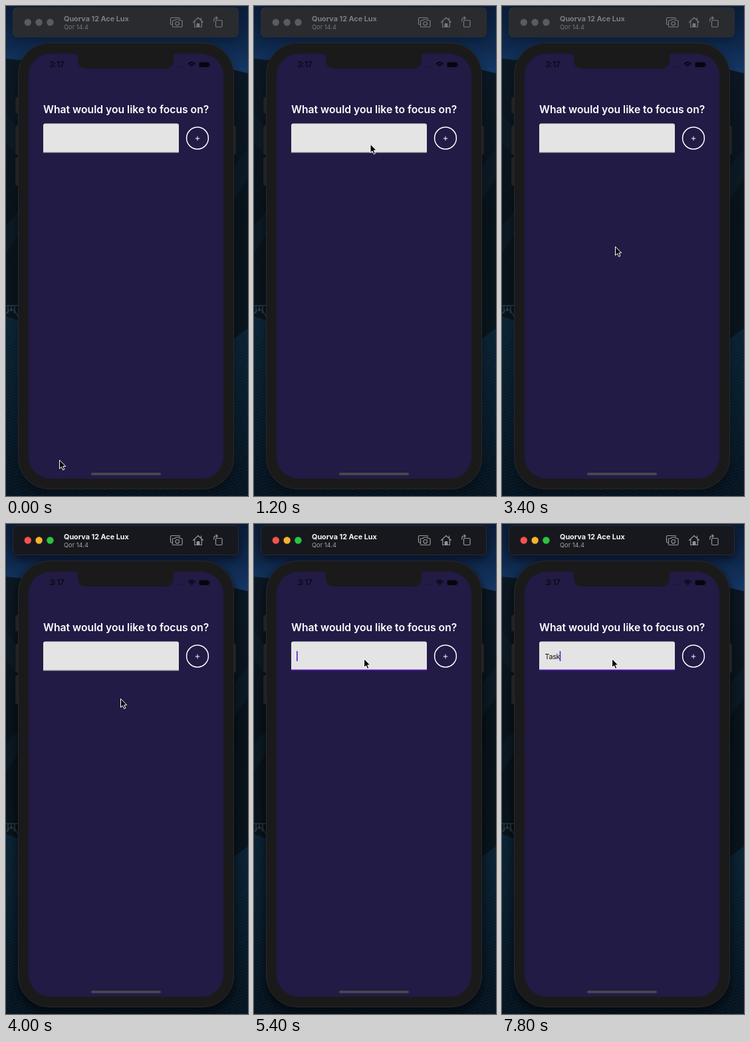
Recreate the animation shown at these times as an HTML page. Size 364 by 736 pixels, loop 8000 ms.

```html
<!DOCTYPE html>
<html lang="en">
<head>
<meta charset="utf-8">
<title>Focus app in a simulator</title>
<style>
  html, body { margin: 0; width: 100%; height: 100%; overflow: hidden; background: #081320; }
  svg { display: block; width: 100%; height: 100%; }
  text { font-family: Inter, "Noto Sans", sans-serif; white-space: pre; }
  .icon { fill: none; stroke-width: 1.2; stroke-linejoin: round; stroke-linecap: round; }

  #window { --bar: #2a2b2e; --title: #7c7d80; --sub: #747578; --icon: #77797c; --red: #5a5b5e; --yellow: #5a5b5e; --green: #5a5b5e; }
  #window.active { --bar: #17181d; --title: #f6f6f7; --sub: #a2a3a6; --icon: #96989b; --red: #f4544c; --yellow: #f6b42c; --green: #2bc443; }
  #shadow { opacity: .25; }
  .active #shadow { opacity: .55; }
</style>
</head>
<body>
<svg viewBox="0 0 364 736" preserveAspectRatio="none">
  <defs>
    <linearGradient id="sky" x2="0" y2="1">
      <stop stop-color="#0c1d38"/><stop offset=".55" stop-color="#0f2a50"/><stop offset="1" stop-color="#163c6b"/>
    </linearGradient>
    <linearGradient id="land" x2="0" y2="1">
      <stop stop-color="#0c1824"/><stop offset=".35" stop-color="#09131b"/><stop offset="1" stop-color="#0a161f"/>
    </linearGradient>
    <linearGradient id="sea" x2="0" y2="1">
      <stop stop-color="#0b2233"/><stop offset=".5" stop-color="#081b2a"/><stop offset="1" stop-color="#06121e"/>
    </linearGradient>
    <pattern id="waves" width="9" height="5" patternUnits="userSpaceOnUse" patternTransform="rotate(14)">
      <path d="M0 1.500Q2.500 .5 5 1.500M4 4Q6.500 3 9 4" fill="none" stroke="#1d4258" stroke-width=".8"/>
    </pattern>
    <filter id="blur" x="-20%" y="-20%" width="140%" height="140%"><feGaussianBlur stdDeviation="7"/></filter>
  </defs>

  <!-- Wallpaper -->
  <rect width="364" height="110" fill="url(#sky)"/>
  <path d="M0 79 18 81 180 76 343 96 364 101V736H0Z" fill="url(#land)"/>
  <path d="M0 160 18 186V225L0 205ZM343 240 364 215V260L343 290ZM0 330 18 310V345L0 372Z" fill="#10202d" opacity=".5"/>
  <path id="water" d="M0 466 18 472 343 500 364 484V736H0Z" fill="url(#sea)"/>
  <use href="#water" style="fill: url(#waves)"/>
  <path d="M0 466 18 472 343 500 364 484V736H0Z" fill="url(#waves)" opacity=".45"/>
  <path d="M0 450H18M3 451V462M8 451V459M13 451V462M0 463Q9 447 18 466" fill="none" stroke="#50687a" opacity=".7"/>

  <g id="window">
    <g id="shadow" filter="url(#blur)">
      <rect x="10" y="8" width="340" height="45" rx="9"/>
      <rect x="16" y="60" width="329" height="674" rx="47"/>
    </g>
    <rect x="10.500" y="2.500" width="339" height="44" rx="6" fill="var(--bar)" stroke="#34363a" stroke-width=".7"/>
    <circle cx="32.800" cy="24.500" r="5.200" fill="var(--red)"/>
    <circle cx="49.600" cy="24.500" r="5.200" fill="var(--yellow)"/>
    <circle cx="66.400" cy="24.500" r="5.200" fill="var(--green)"/>
    <text x="87" y="23" font-size="10.800" font-weight="700" fill="var(--title)">Quorva 12 Ace Lux</text>
    <text x="87" y="34.500" font-size="9.300" fill="var(--sub)">Qor 14.4</text>
    <g class="icon" stroke="var(--icon)">
      <path d="M250 28H249Q247.500 28 247.500 26.500V19Q247.500 17.500 249 17.500H260Q261.500 17.500 261.500 19"/>
      <path d="M252 21.500H254.500L255.500 20H260L261 21.500H263.500Q265 21.500 265 23V30Q265 31.500 263.500 31.500H252Q250.500 31.500 250.500 30V23Q250.500 21.500 252 21.500Z"/>
      <circle cx="257.700" cy="26.300" r="2.800"/>
      <path d="M281.500 24.500 289 17.500 296.500 24.500M283.700 23V31.500H294.300V23M293.500 21V18"/>
      <path d="M287.200 26.500H290.800V31.500H287.200Z" fill="var(--icon)"/>
      <rect x="315.500" y="21.500" width="9.500" height="10" rx="1.500"/>
      <path d="M312.800 23V20.500Q312.800 18 315.300 18H318M316 16 318.200 18 316 20"/>
    </g>
  </g>

  <!-- Phone -->
  <g fill="#222325" stroke="#141517" stroke-width=".5">
    <rect x="14" y="137" width="6" height="24" rx="1.500"/>
    <rect x="14" y="180" width="6" height="43" rx="1.500"/>
    <rect x="14" y="227" width="6" height="43" rx="1.500"/>
    <rect x="341" y="180" width="5" height="43" rx="1.500"/>
  </g>
  <rect x="18.500" y="55.500" width="324" height="670" rx="47" fill="#1a1a1b" stroke="#28292b"/>
  <rect x="34" y="71.500" width="293" height="638.500" rx="33" fill="#211b45"/>
  <path d="M103 71H257Q252 71.500 252 76V81Q252 94 239 94H121Q108 94 108 81V76Q108 71.500 103 71Z" fill="#1a1a1b"/>

  <!-- Status bar -->
  <text x="65.500" y="92.300" font-size="11.500" font-weight="500" fill="#08070f">3:17</text>
  <path d="M258 91.500H266" stroke="#100d22" stroke-width="1" stroke-dasharray="1 1.300"/>
  <g fill="none" stroke="#060509" stroke-width="1.700">
    <path d="M274.300 87.100Q279.300 82.400 284.300 87.100M276.200 89.200Q279.300 86.400 282.400 89.200"/>
    <path d="M277.800 90.300H280.800L279.300 92Z" fill="#060509" stroke="none"/>
  </g>
  <rect x="290.500" y="84.500" width="15" height="7.300" rx="2" fill="#060509"/>
  <rect x="306" y="87" width="1.200" height="2.600" rx=".6" fill="#0b0918"/>

  <!-- App -->
  <text x="56" y="161.300" font-size="15.700" font-weight="600" fill="#fff">What would you like to focus on?</text>
  <path d="M56 220V179.500Q56 176.500 59 176.500H257Q260 176.500 260 179.500V220Z" fill="#e4e4e4"/>
  <rect id="underline" x="56" width="204"/>
  <text id="entry" x="64.500" y="202.700" font-size="10.800" letter-spacing="-.3" fill="#111"></text>
  <rect id="caret" y="191" width="1.600" height="15" fill="#6418cf"/>
  <circle cx="288" cy="198.500" r="16.400" fill="none" stroke="#fff" stroke-width="1.500"/>
  <path d="M284.800 199H291.200M288 195.800V202.200" stroke="#fff" stroke-width="1"/>
  <rect x="128" y="701" width="105" height="3.700" rx="1.850" fill="#49484b"/>

  <path id="cursor" d="M0 0V13L3 10.300 5.200 15 7.400 14 5.300 9.400H9.300Z" fill="#050505" stroke="#fff" stroke-width="1" stroke-linejoin="round"/>
</svg>
<script>
const LOOP = 8000, STEP = 100;
const ACTIVATED = 3700, FOCUSED = 4900;
const keyTimes = [7300, 7500, 7600, 7800];
const word = "Task";

// Cursor stops: time, x, y
const stops = [
  [0, 80.5, 682], [1000, 175, 207.5], [3000, 175, 207.5], [3400, 170.5, 361.5],
  [3700, 170.5, 361.5], [4000, 172.5, 262.5], [4500, 165.5, 202.5], [LOOP, 165.5, 202.5]
];

const byId = id => document.getElementById(id);
const [windowBar, underline, entry, caret, cursor] =
  ["window", "underline", "entry", "caret", "cursor"].map(byId);
const clamp = v => Math.min(1, Math.max(0, v));
const ease = p => p * p * (3 - 2 * p);

function cursorAt(t) {
  const next = stops.findIndex(s => s[0] > t);
  const [t0, x0, y0] = stops[next - 1], [t1, x1, y1] = stops[next];
  const p = ease((t - t0) / (t1 - t0));
  return [x0 + (x1 - x0) * p, y0 + (y1 - y0) * p];
}

function caretOpacity(t) {
  if (t < FOCUSED) return 0;
  if (t >= keyTimes[0]) return 1;
  const phase = (t - FOCUSED) % 1000;
  return Math.max(clamp((700 - phase) / 100), clamp((phase - 900) / 100));
}

function draw(t) {
  const focused = t >= FOCUSED;
  windowBar.classList.toggle("active", t >= ACTIVATED);
  cursor.setAttribute("transform", `translate(${cursorAt(t)})`);

  underline.setAttribute("y", focused ? 218.6 : 219.3);
  underline.setAttribute("height", focused ? 1.7 : 1.2);
  underline.setAttribute("fill", focused ? "#5512b5" : "#a3a2a8");

  const typed = word.slice(0, keyTimes.filter(k => t >= k).length);
  if (entry.textContent !== typed) entry.textContent = typed;
  caret.setAttribute("x", 64 + (typed ? entry.getComputedTextLength() : 0));
  caret.setAttribute("opacity", caretOpacity(t));
}

function tick() {
  const t = performance.now() % LOOP;
  draw(Math.floor(t / STEP) * STEP);
  requestAnimationFrame(tick);
}
tick();
</script>
</body>
</html>
```
